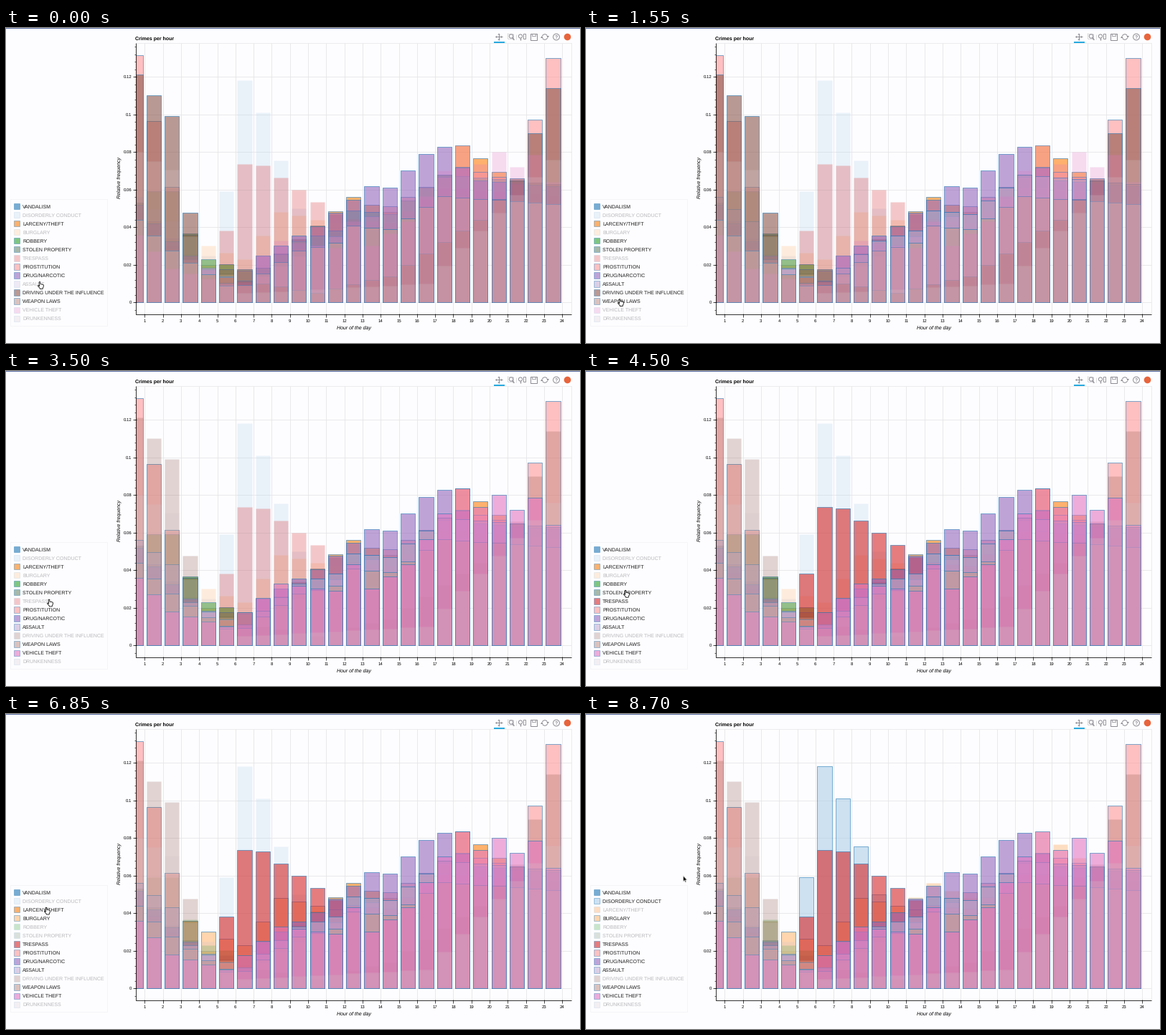
A matplotlib script that plays this animation: 800x440 px, repeating every 8750 ms.

```python
import matplotlib.pyplot as plt
import numpy as np
from matplotlib.animation import FuncAnimation
from matplotlib.collections import PolyCollection
from matplotlib.colors import to_rgba
from matplotlib.patches import Arc, Circle, Polygon, Rectangle

W, H, DPI = 800, 440, 100
PX = 72 / DPI
FRAMES, STEP = 175, 50
LEFT, RIGHT, TOP, BOTTOM, ZERO = 180.5, 788, 21, 400.5, 383.3
BLUE, ICON, BG = "#1f77b4", "#8d8d93", "#fdfdff"
HOURS = np.arange(24)

plt.rcParams.update({"font.family": "Liberation Sans", "text.hinting": "none"})

fig = plt.figure(figsize=(W / DPI, H / DPI), dpi=DPI, facecolor=BG)
ax = fig.add_axes([0, 0, 1, 1])
ax.set(xlim=(0, W), ylim=(H, 0))
ax.axis("off")


def hour_x(h):
    return 193.3 + 25.3 * (h - 1)


def freq_y(f):
    return ZERO - 2627 * f


def row_y(i):
    return 249 + 12.06 * i


# Frequencies are in thousandths, as (hour, value) key points
def curve(points):
    return np.interp(HOURS, *zip(*points))


TYPICAL = curve([(0, 53), (2, 33), (5, 10.5), (6, 11), (9, 33), (11, 38),
                 (12, 49), (14, 47), (17, 68), (23, 63)])
names, colors, bars_xy = [], [], []


def add(name, color, *points, share=1.0):
    """Follow the key points within their span, the typical day elsewhere."""
    values = TYPICAL * share
    if points:
        own = (HOURS >= points[0][0]) & (HOURS <= points[-1][0])
        values = np.where(own, curve(points), values)
    names.append(name)
    colors.append(color)
    for h, y in zip(HOURS, freq_y(values / 1000)):
        x0, x1 = hour_x(h + 0.1), hour_x(h + 0.9)
        bars_xy.append([(x0, ZERO), (x0, y), (x1, y), (x1, ZERO)])


add("VANDALISM", "#1f77b4")
add("DISORDERLY CONDUCT", "#aecfe9", (5, 59), (6, 118), (7, 101), (9, 50),
    share=0.85)
add("LARCENY/THEFT", "#ff7f0e", (3, 36), (4, 20), (6, 11), (12, 56), (14, 48),
    (17, 66), (18, 83.4), (20, 69.5))
add("BURGLARY", "#ffbb78", (4, 30), (6, 23), (8, 48), (11, 42), share=0.9)
add("ROBBERY", "#2ca02c", (1, 59), (2, 59), (3, 36.7), (4, 23), (6, 17.5))
add("STOLEN PROPERTY", "#6f8a70", (2, 34), (3, 36), (4, 18), (6, 17))
add("TRESPASS", "#d62728", (4, 15), (5, 38), (6, 73.6), (7, 72.8), (11, 47),
    share=0.9)
add("PROSTITUTION", "#ff9896", (0, 131.5), (2, 61.4), (3, 23), (6, 9),
    (18, 72), (21, 64), (23, 130))
add("DRUG/NARCOTIC", "#9467bd", (7, 25), (10, 40.5), (13, 61.7), (14, 61),
    (16, 79), (17, 82.6), (18, 71.7), share=0.98)
add("ASSAULT", "#c5b0d5", (0, 56), (2, 43), (3, 23))
add("DRIVING UNDER THE INFLUENCE", "#8c564b", (0, 121), (2, 99), (3, 47.7),
    (4, 15), (10, 5), (14, 14), (19, 44), (21, 66), (23, 114))
add("WEAPON LAWS", "#c49c94", share=0.83)
add("VEHICLE THEFT", "#e377c2", (0, 36), (2, 18), (5, 10), (8, 33), (11, 29),
    (12, 43), (13, 30), (15, 43), (18, 83.5), (19, 73.6), (20, 80), (21, 72),
    (22, 78.5), (23, 64))
add("DRUNKENNESS", "#d5c5cc", (0, 80), (2, 70.5), (3, 35), (6, 5), (16, 10),
    (23, 76))

MUTED = {"DISORDERLY CONDUCT", "BURGLARY", "TRESPASS", "ASSAULT",
         "VEHICLE THEFT", "DRUNKENNESS"}

# Pointer visits: time, legend row, x, clicked
VISITS = [
    (400, "ASSAULT", 44, True),
    (1450, "WEAPON LAWS", 44, False),
    (1800, "DRIVING UNDER THE INFLUENCE", 46, True),
    (2550, "VEHICLE THEFT", 64, True),
    (3750, "TRESPASS", 57, True),
    (4700, "STOLEN PROPERTY", 52, True),
    (5700, "ROBBERY", 51, True),
    (6300, "BURGLARY", 52, True),
    (7050, "LARCENY/THEFT", 53, True),
    (7600, "DISORDERLY CONDUCT", 54, True),
]
stops = []
for when, name, x, _ in VISITS:
    y = row_y(names.index(name)) - 3
    stops += [(when - 200, x, y), (when + 120, x, y)]
stops.append((8350, 135.5, 226))
stops = np.array(stops)


def line(xs, ys, color="black", width=1, z=1):
    ax.plot(xs, ys, color=color, lw=width * PX, zorder=z,
            solid_capstyle="butt")


def text(x, y, s, size=7, **kw):
    return ax.text(x, y, s, fontsize=size * PX, **kw)


def box(x, y, w, h, **kw):
    return ax.add_patch(Rectangle((x, y), w, h, **kw))


def ring(x, y, r, **kw):
    ax.add_patch(Circle((x, y), r, fc=BG, ec=ICON, lw=PX, **kw))


def draw_axes():
    box(0, 0, W, 1, fc="#5f70a8", ec="none")
    grid = "#e4e4e6"
    for h in range(1, 25):
        x = hour_x(h)
        line([x, x], [TOP, BOTTOM], grid, 0.8)
        line([x, x], [BOTTOM - 1, BOTTOM + 3.2], width=0.7, z=6)
        text(x, 410.6, str(h), 6, ha="center")
    for f in np.arange(7) * 0.02:
        y = freq_y(f)
        line([LEFT, RIGHT], [y, y], grid, 0.8)
        line([LEFT - 3.2, LEFT + 1], [y, y], width=0.7, z=6)
        text(175, y + 2.1, f"{f:g}", 6, ha="right")
    for i in range(-1, 35):
        y = freq_y(0.004 * i)
        line([LEFT - 2, LEFT], [y, y], width=0.6, z=6)
    line([LEFT, RIGHT, RIGHT], [TOP, TOP, BOTTOM], "#e8e8ea", 0.8)
    line([LEFT, LEFT, RIGHT], [TOP, BOTTOM, BOTTOM], width=0.8, z=6)
    text(180.5, 16.1, "Crimes per hour", weight="bold")
    text(485, 420.1, "Hour of the day", style="italic", ha="center")
    text(158, 209.5, "Relative frequency", style="italic", rotation=90,
         ha="center", va="center")


def draw_toolbar():
    # pan
    line([682.5, 691.5], [12.5, 12.5], ICON)
    line([687, 687], [8, 17], ICON)
    for dx, dy in ((1, 0), (-1, 0), (0, 1), (0, -1)):
        tip = np.array([687 + 5 * dx, 12.5 + 5 * dy])
        side = np.array([dy, dx]) * 1.7
        back = tip - 2 * np.array([dx, dy])
        ax.add_patch(Polygon([tip, back + side, back - side], fc=ICON))
    box(680, 19, 15, 1.8, fc="#26aae1", ec="none")
    # box zoom
    box(699, 8, 8, 7, fill=False, ec=ICON, lw=0.8 * PX, ls=":")
    ring(704, 11.5, 2.7)
    line([705.8, 708.3], [13.5, 16.8], ICON, 1.5)
    # wheel zoom
    line([711, 711], [9, 16], "#d5d5d8", 0.8)
    ring(717, 11.5, 2.6)
    line([717, 717], [14, 17], ICON, 1.3)
    box(720.5, 8.5, 3, 6.5, fill=False, ec=ICON, lw=0.9 * PX)
    # save
    box(731, 8, 9, 9, fill=False, ec=ICON, lw=PX)
    box(733, 8, 5, 3, fill=False, ec=ICON, lw=0.8 * PX)
    # reset
    for a in (20, 200):
        ax.add_patch(Arc((751, 12.5), 7.5, 7.5, theta1=a, theta2=a + 130,
                         ec=ICON, lw=PX))
    ax.add_patch(Polygon([(753.5, 11), (757, 11), (755, 14)], fc=ICON))
    ax.add_patch(Polygon([(745, 14), (748.5, 14), (747, 11)], fc=ICON))
    # help
    ring(767, 12.5, 4.4)
    text(767, 15, "?", 7, color=ICON, ha="center", weight="bold")
    # plain mark
    ax.add_patch(Circle((782.5, 12.5), 4.8, fc="#e8643c", ec="none"))


draw_axes()
draw_toolbar()

bars = PolyCollection(bars_xy, linewidths=0.7 * PX, zorder=3)
ax.add_collection(bars, autolim=False)
bars.set_clip_path(Rectangle((LEFT, TOP), RIGHT - LEFT, BOTTOM - TOP,
                             transform=ax.transData))

box(6, 239.5, 135, 177, fc=BG, ec="#f3f3f5", lw=0.8 * PX)
swatches, labels = [], []
for i, name in enumerate(names):
    swatches.append(box(10.8, row_y(i) - 4.2, 8.4, 8.4, lw=0.7 * PX))
    labels.append(text(23, row_y(i) + 2.5, name))

HAND = 0.9 * np.array([
    (3, 0), (4.2, 0.3), (4.4, 3.6), (7.3, 3.9), (8.8, 4.6), (9.3, 5.4),
    (9, 8), (8, 9.6), (8, 11), (3.8, 11), (3.3, 9.6), (0.6, 6.6),
    (0.8, 5.6), (1.8, 5.7), (2.7, 6.7), (2.3, 0.6)])
ARROW = np.array([(0, 0), (0, 8), (1.8, 6.4), (3, 9.2), (4.3, 8.6),
                  (3.1, 6), (5.5, 5.8)])
pointer = ax.add_patch(Polygon(HAND, zorder=9, lw=0.8 * PX))


def muted_at(t):
    muted = set(MUTED)
    for when, name, _, clicked in VISITS:
        if clicked and t >= when:
            muted ^= {name}
    return muted


def pointer_at(t):
    i = np.clip(np.searchsorted(stops[:, 0], t, side="right"),
                1, len(stops) - 1)
    a, b = stops[i - 1], stops[i]
    u = np.clip((t - a[0]) / (b[0] - a[0]), 0, 1)
    u = u * u * (3 - 2 * u)
    return a[1:] * (1 - u) + b[1:] * u


def update(n):
    t = n * STEP
    muted = muted_at(t)
    faces, edges = [], []
    for name, color, swatch, label in zip(names, colors, swatches, labels):
        off = name in muted
        fill = to_rgba(color, 0.25 if off else 0.6)
        faces += [fill] * len(HOURS)
        edges += [to_rgba(BLUE, 0 if off else 0.8)] * len(HOURS)
        swatch.set_facecolor(fill)
        swatch.set_edgecolor(to_rgba(BLUE, 0.12 if off else 0.55))
        label.set_color("#b9b9bd" if off else "#1c1c1c")
    bars.set_facecolor(faces)
    bars.set_edgecolor(edges)

    x, y = pointer_at(t)
    inside = x < 138 and y > 239
    pointer.set_xy((HAND if inside else ARROW) + (x, y))
    pointer.set_facecolor("white" if inside else "black")
    pointer.set_edgecolor("black" if inside else "#d8d8d8")
    return bars, pointer, *swatches, *labels


anim = FuncAnimation(fig, update, frames=FRAMES, interval=STEP,
                     repeat=True, repeat_delay=0, blit=False)
plt.show()
```
